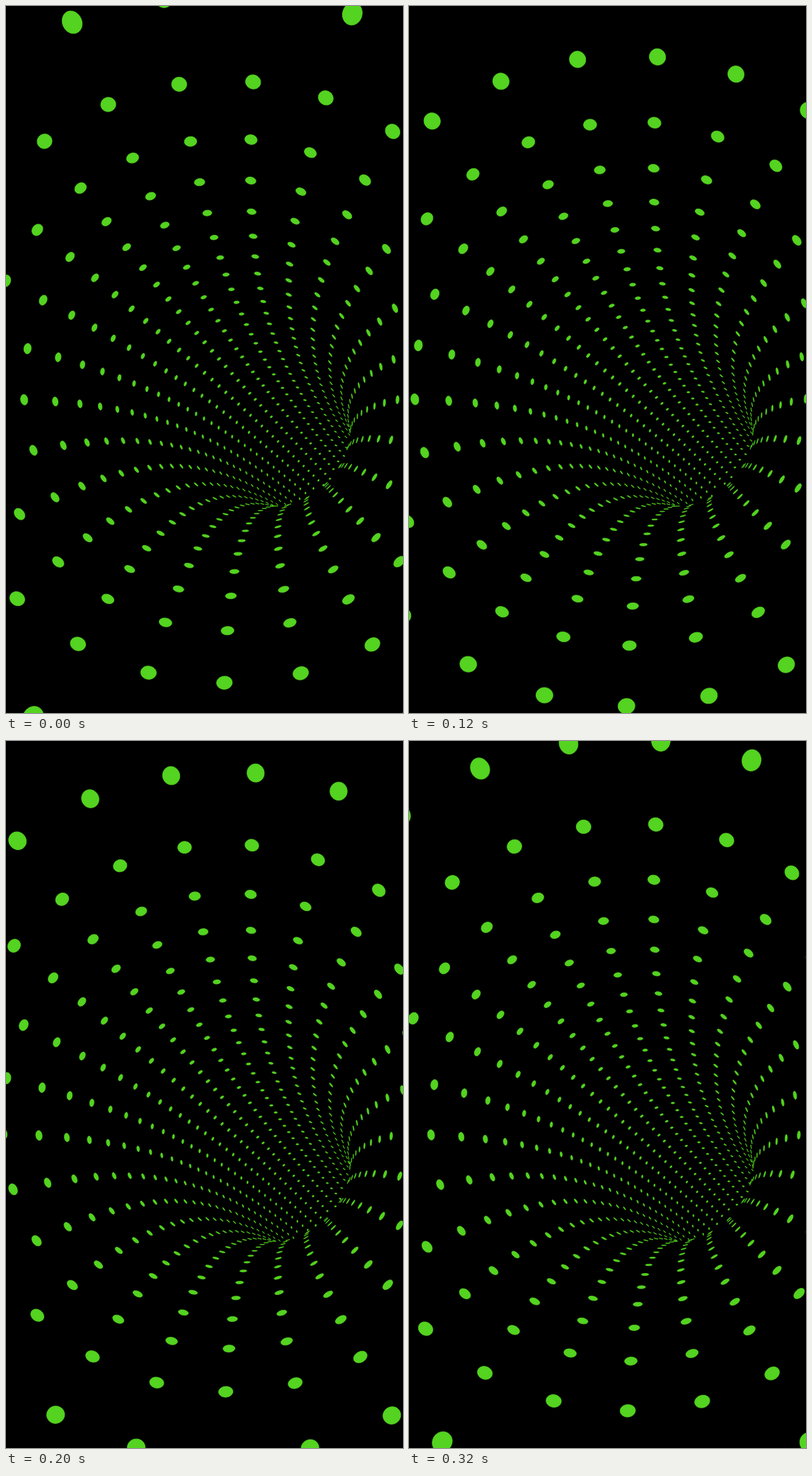
Write an HTML page with a canvas that moves like this. It is 561x998 px and loops after 360 ms.

```html
<!DOCTYPE html>
<html lang="en">
<head>
<meta charset="utf-8">
<title>Dotted tunnel</title>
<style>
  html, body { margin: 0; width: 100%; height: 100%; overflow: hidden; background: #000; }
  canvas { display: block; width: 561px; height: 998px; }
</style>
</head>
<body>
<canvas id="stage" width="561" height="998"></canvas>
<script>
const W = 561, H = 998;
const ctx = document.getElementById('stage').getContext('2d');

// The tunnel is the inside of a torus with main radius 1, seen from its centre line.
const EYE_X = 278.1, EYE_Y = 498.1;
const FOCAL = 1070;
const TUBE = 0.0257;          // tube radius
const PITCH = 0.0145;         // arc angle between rings
const PER_RING = 25;
const STEP = 2 * Math.PI / PER_RING;
const BEND = Math.PI / 4;     // the tunnel turns towards the lower right
const START = 44.2 * Math.PI / 180;
const FIRST = 0.47;           // ring offset from the eye at time zero
const RINGS = 44;
const NEAREST = 2.4;
const DOT = 0.102;            // dot radius in cells
const EDGE = 0.8;             // soft rim that keeps far dots visible
const SIDES = 24;
const GREEN = '#54d320';

const LOOP = 360, TICK = 40;

// Wall point: u towards the bend, v across it, z ahead.
function wall(ring, theta) {
  const a = ring * PITCH;
  const radius = 1 - TUBE * Math.cos(theta);
  return {
    u: 1 - radius * Math.cos(a),
    v: TUBE * Math.sin(theta),
    z: radius * Math.sin(a)
  };
}

function project({ u, v, z }) {
  const k = FOCAL / z, c = Math.cos(BEND), s = Math.sin(BEND);
  return [EYE_X + k * (u * c - v * s), EYE_Y + k * (u * s + v * c)];
}

function insideTube(p, t) {
  const off = Math.hypot(1 - p.u * t, p.z * t) - 1;
  return Math.hypot(off, p.v * t) < TUBE;
}

// A point is seen when the line of sight never leaves the tube.
function visible(p) {
  if (!insideTube(p, 0.999)) return false;
  for (let t = 0.04; t < 1; t += 0.03) {
    if (!insideTube(p, t)) return false;
  }
  return true;
}

function drawDot(ring, theta) {
  ctx.beginPath();
  for (let i = 0; i < SIDES; i++) {
    const q = i / SIDES * 2 * Math.PI;
    const p = wall(ring + DOT * Math.cos(q), theta + DOT * STEP * Math.sin(q));
    ctx[i ? 'lineTo' : 'moveTo'](...project(p));
  }
  ctx.closePath();
  ctx.fill();
  ctx.stroke();
}

function draw(time) {
  const phase = Math.floor(time % LOOP / TICK) * TICK / LOOP;
  ctx.fillStyle = '#000';
  ctx.fillRect(0, 0, W, H);
  ctx.fillStyle = ctx.strokeStyle = GREEN;
  ctx.lineWidth = EDGE;
  ctx.lineJoin = 'round';
  for (let i = RINGS; i > 0; i--) {
    const ring = i + FIRST - phase;
    if (ring < NEAREST) break;
    for (let j = 0; j < PER_RING; j++) {
      const theta = START + j * STEP;
      if (visible(wall(ring, theta))) drawDot(ring, theta);
    }
  }
}

function frame() {
  draw(performance.now());
  requestAnimationFrame(frame);
}
frame();
</script>
</body>
</html>
```
